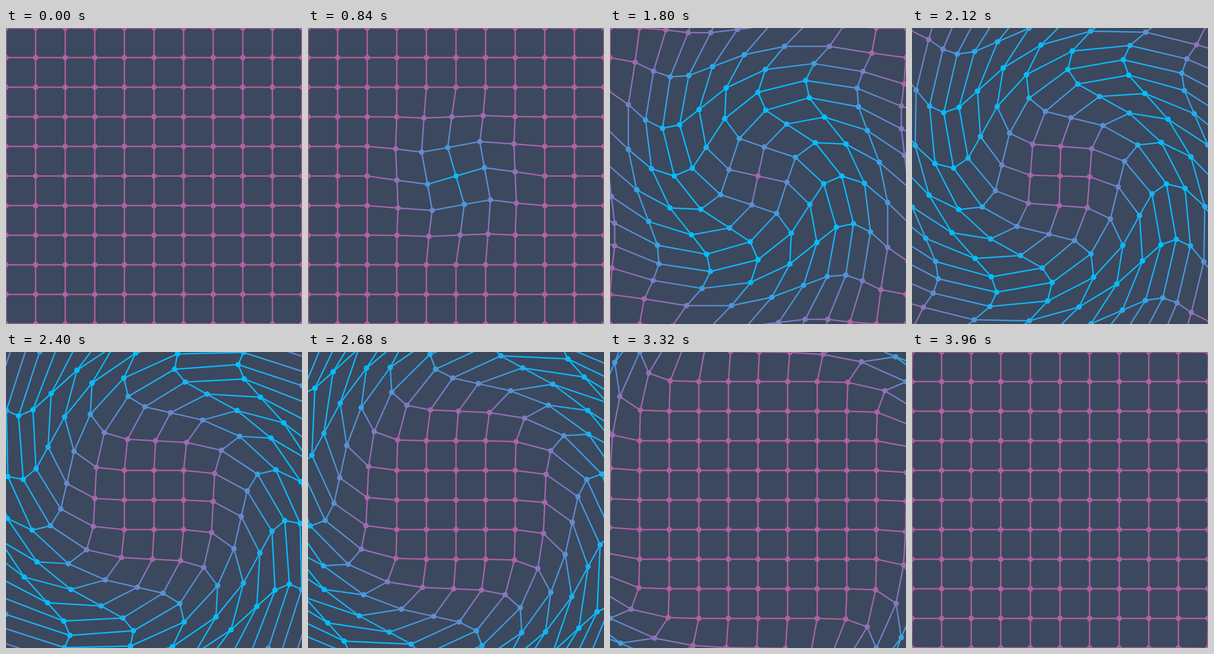
An HTML page with a canvas for the animation above (4 s loop, 540 px wide and 540 px high).

```html
<!DOCTYPE html>
<html lang="en">
<head>
<meta charset="utf-8">
<title>Twisting grid</title>
<style>
  html, body { margin: 0; width: 100%; height: 100%; overflow: hidden; background: #3c485e; }
  canvas { display: block; width: 540px; height: 540px; }
</style>
</head>
<body>
<canvas id="stage" width="540" height="540"></canvas>
<script>
const ctx = document.getElementById('stage').getContext('2d');
const LOOP = 4000, STEP = 40, TURN = 2000;
const MID = 270, GAP = 54, REACH = 8, SIDE = 2 * REACH + 1;
const CORNER = Math.hypot(MID, MID);
const REST = [178, 95, 164], ACTIVE = [0, 191, 255];

const mix = k => `rgb(${REST.map((c, i) => Math.round(c + (ACTIVE[i] - c) * k)).join()})`;

// Each node makes a quarter turn about the centre, delayed by its distance.
function node(col, row, time) {
  const x = (col - REACH) * GAP, y = (row - REACH) * GAP;
  const delay = Math.hypot(x, y) / CORNER * (LOOP - TURN);
  const p = Math.min(1, Math.max(0, (time - delay) / TURN));
  const angle = Math.PI / 4 * (1 - Math.cos(Math.PI * p));
  const c = Math.cos(angle), s = Math.sin(angle);
  return {
    x: MID + x * c + y * s,
    y: MID - x * s + y * c,
    color: mix(Math.sin(Math.PI * p) ** 2)
  };
}

function link(a, b) {
  if (a.color === b.color) {
    ctx.strokeStyle = a.color;
  } else {
    const g = ctx.createLinearGradient(a.x, a.y, b.x, b.y);
    g.addColorStop(0, a.color);
    g.addColorStop(1, b.color);
    ctx.strokeStyle = g;
  }
  ctx.beginPath();
  ctx.moveTo(a.x, a.y);
  ctx.lineTo(b.x, b.y);
  ctx.stroke();
}

function draw(time) {
  ctx.fillStyle = '#3c485e';
  ctx.fillRect(0, 0, 540, 540);
  ctx.lineWidth = 2.5;

  const nodes = Array.from({ length: SIDE * SIDE },
    (_, i) => node(i % SIDE, Math.floor(i / SIDE), time));

  nodes.forEach((n, i) => {
    if (i % SIDE < SIDE - 1) link(n, nodes[i + 1]);
    if (i + SIDE < nodes.length) link(n, nodes[i + SIDE]);
  });
  for (const n of nodes) {
    ctx.fillStyle = n.color;
    ctx.beginPath();
    ctx.arc(n.x, n.y, 5, 0, 2 * Math.PI);
    ctx.fill();
  }
}

let shown = -1;
function tick() {
  const time = Math.floor(performance.now() % LOOP / STEP) * STEP;
  if (time !== shown) draw(shown = time);
  requestAnimationFrame(tick);
}
tick();
</script>
</body>
</html>
```
